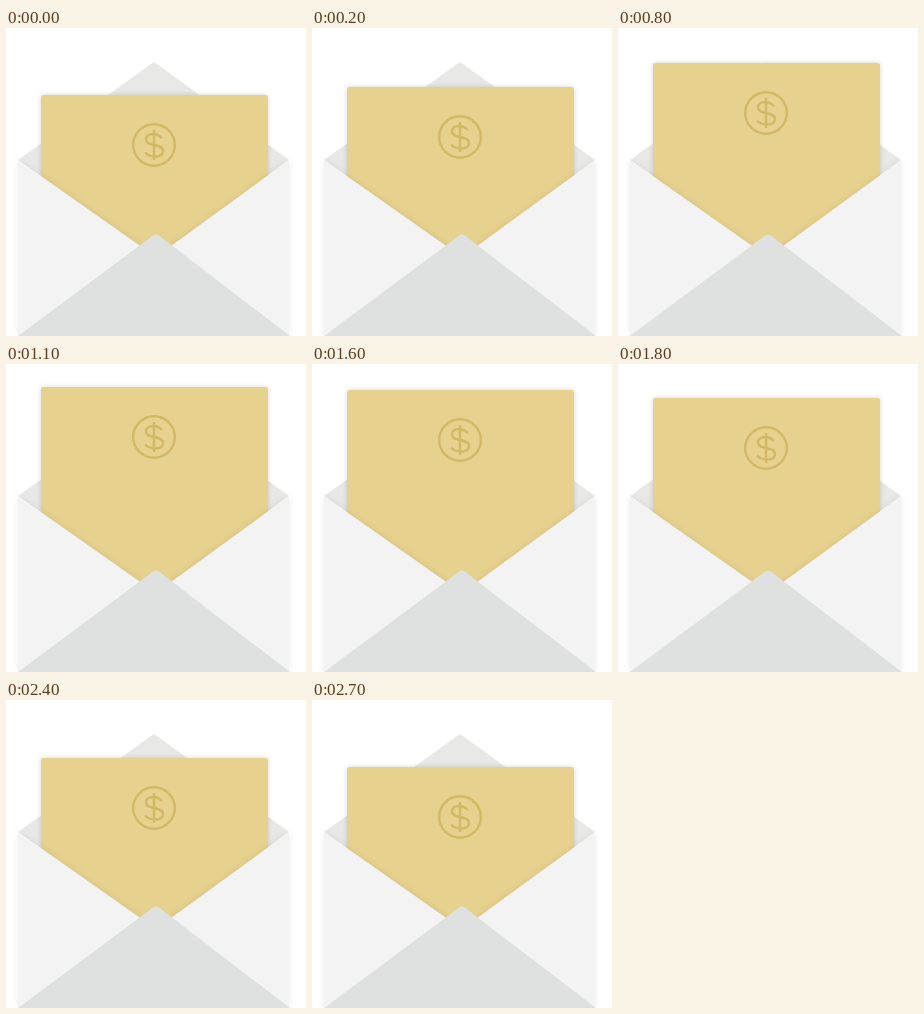
Animation of 300x308 px, one loop 3.2 s. Source, as an HTML page:

```html
<!DOCTYPE html>
<html lang="en">
<head>
<meta charset="utf-8">
<title>Letter in an envelope</title>
<style>
html, body { margin: 0; width: 100%; height: 100%; overflow: hidden; background: #fff; }
svg { display: block; }
#card { filter: drop-shadow(0 0 2.5px rgba(0, 0, 0, .16)); }
#front { filter: drop-shadow(0 0 3px rgba(0, 0, 0, .08)); }
#coin { fill: none; stroke: #d3b965; stroke-width: 2.4; }
</style>
</head>
<body>
<svg width="300" height="308" viewBox="0 0 300 308">
  <path d="M12 132L146 35.3Q148 33.8 150 35.3L283 132L150 228Z" fill="#e8e8e6"/>
  <g id="card">
    <rect x="35" width="227" height="210" rx="2.5" fill="#e6d18e"/>
    <g id="coin" transform="translate(148 50)">
      <circle r="20.8"/>
      <path d="M8-7C5-10 2-11-1-11C-5-11-8-9-8-5.5C-8-1.5-4-1 0 0C5 1 9 2 9 6C9 10 5 11.5 1 11.5C-3 11.5-6 10.5-9 7.5M0-15V15"/>
    </g>
  </g>
  <path id="front" d="M12 132L150 229L283 132V308H12Z" fill="#f3f3f3"/>
  <path d="M12 308L147.5 207.3Q150 205.5 152.5 207.3L284 308Z" fill="#dfe1e0"/>
</svg>
<script>
const LOOP = 3200, STEP = 100, LOW = 67, HIGH = 23;
const card = document.getElementById('card');
const start = performance.now();

// The card moves 4 px per tick: up, a pause, then down again.
function cardTop(time) {
  const tick = Math.floor(time / STEP);
  return tick < 16
    ? Math.max(HIGH, LOW - 4 * tick)
    : Math.min(LOW, HIGH + 3 + 4 * (tick - 16));
}

function draw(now) {
  const time = Math.max(0, now - start) % LOOP;
  card.setAttribute('transform', `translate(0 ${cardTop(time)})`);
  requestAnimationFrame(draw);
}
draw(start);
</script>
</body>
</html>
```
